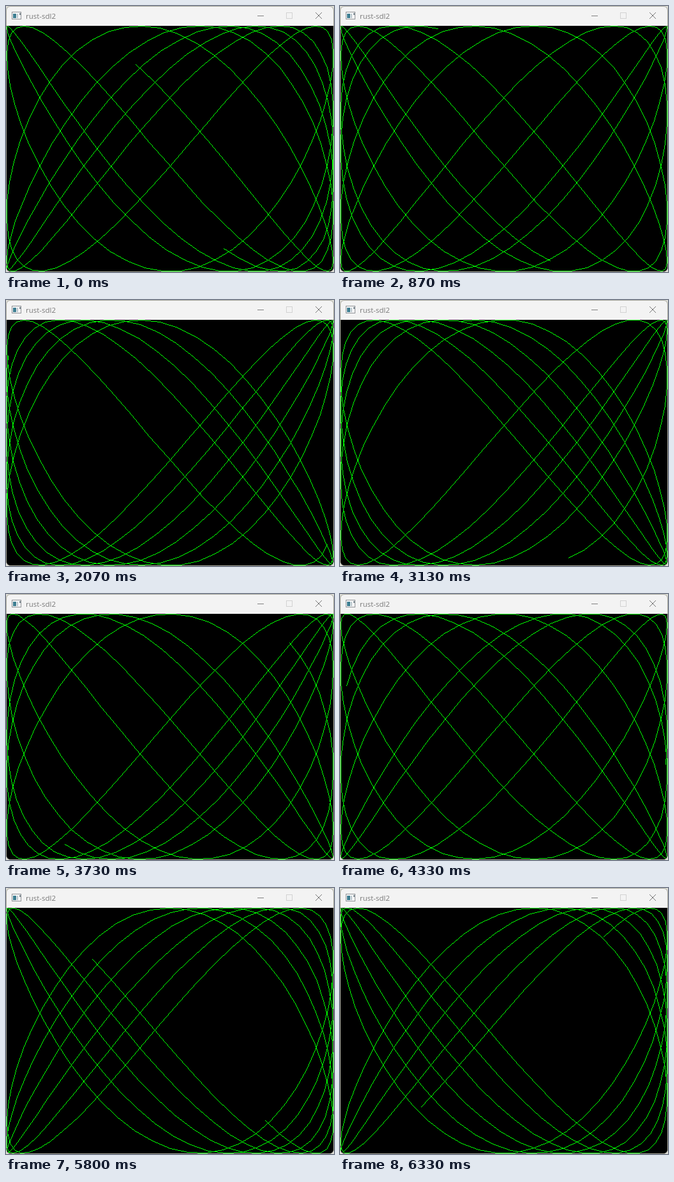
These frames come from a looping animation (514 by 416 pixels, 6.39 s). An HTML page with a canvas:

```html
<!DOCTYPE html>
<html lang="en">
<head>
<meta charset="utf-8">
<title>rust-sdl2</title>
<style>
  html, body { margin: 0; width: 100%; height: 100%; overflow: hidden; background: #dcdcd6; }
  .window {
    position: absolute; left: 0; top: 0; width: 512px; height: 414px;
    border: 1px solid #a6a69a; border-radius: 7px; overflow: hidden; background: #f3f3f3;
  }
  .title {
    position: absolute; left: 30px; top: 0;
    font: 11.5px/30px "Open Sans", "Noto Sans", sans-serif; color: #7a7a7a; white-space: pre;
  }
  svg { position: absolute; left: 0; top: 0; }
  canvas { position: absolute; left: 0; top: 30px; background: #000; }
</style>
</head>
<body>
<div class="window">
  <svg width="512" height="30" viewBox="1 1 512 30" fill="none" shape-rendering="crispEdges">
    <rect x="9.5" y="9.5" width="14" height="11" fill="#fafafa" stroke="#8f9296"/>
    <rect x="11" y="12" width="5" height="7" fill="#3f7f92"/>
    <rect x="17" y="12" width="2" height="7" fill="#b9c6cc"/>
    <rect x="21" y="11" width="2" height="3" fill="#7d8c94"/>
    <path d="M394 15.5h10" stroke="#808080"/>
    <rect x="439.5" y="10.5" width="9" height="9" stroke="#d2d2d2"/>
    <path d="M485 10l10 10M495 10l-10 10" stroke="#777" shape-rendering="auto"/>
  </svg>
  <div class="title">rust-sdl2</div>
  <canvas id="view" width="512" height="384"></canvas>
</div>
<script>
  const LOOP = 6390, FRAMES = 96;
  // Radians along the curve; just under half of it is drawn
  const START = 4.029, STEP = 1 / 60;
  const SEGMENT = 0.01, SEGMENTS = 313;
  // [picture index, steps travelled]: the pace wavers slightly
  const PACE = [[0, 0], [13, 48], [31, 111], [47, 168], [65, 231], [78, 278], [95, 338]];

  const ctx = document.getElementById("view").getContext("2d");

  const startOf = i => Math.round(i * 20 / 3) * 10;

  function frameAt(ms) {
    let i = Math.min(FRAMES - 1, Math.floor(ms * 3 / 200) + 1);
    while (startOf(i) > ms) i--;
    return i;
  }

  function stepsAt(i) {
    const k = PACE.findIndex(([at]) => at >= i);
    if (k < 1) return 0;
    const [i0, s0] = PACE[k - 1], [i1, s1] = PACE[k];
    return Math.round(s0 + (s1 - s0) * (i - i0) / (i1 - i0));
  }

  function point(a) {
    return [
      Math.min(511, Math.floor(256 + 256 * Math.sin(11 * a))),
      Math.min(383, Math.floor(192 + 192 * Math.cos(17 * a)))
    ];
  }

  // Hard-edged line, one pixel wide
  function line([x, y], [x1, y1]) {
    const dx = Math.abs(x1 - x), dy = -Math.abs(y1 - y);
    const sx = Math.sign(x1 - x), sy = Math.sign(y1 - y);
    let err = dx + dy;
    for (;;) {
      ctx.fillRect(x, y, 1, 1);
      if (x === x1 && y === y1) return;
      const e = 2 * err;
      if (e >= dy) { err += dy; x += sx; }
      if (e <= dx) { err += dx; y += sy; }
    }
  }

  function draw(i) {
    const tail = START + STEP * stepsAt(i);
    ctx.fillStyle = "#000";
    ctx.fillRect(0, 0, 512, 384);
    ctx.fillStyle = "#0f0";
    let last = point(tail);
    for (let n = 1; n <= SEGMENTS; n++) {
      const next = point(tail + SEGMENT * n);
      line(last, next);
      last = next;
    }
  }

  const begin = performance.now();
  let shown = -1;

  function tick() {
    const i = frameAt((performance.now() - begin) % LOOP);
    if (i !== shown) draw(shown = i);
    requestAnimationFrame(tick);
  }
  tick();
</script>
</body>
</html>
```
